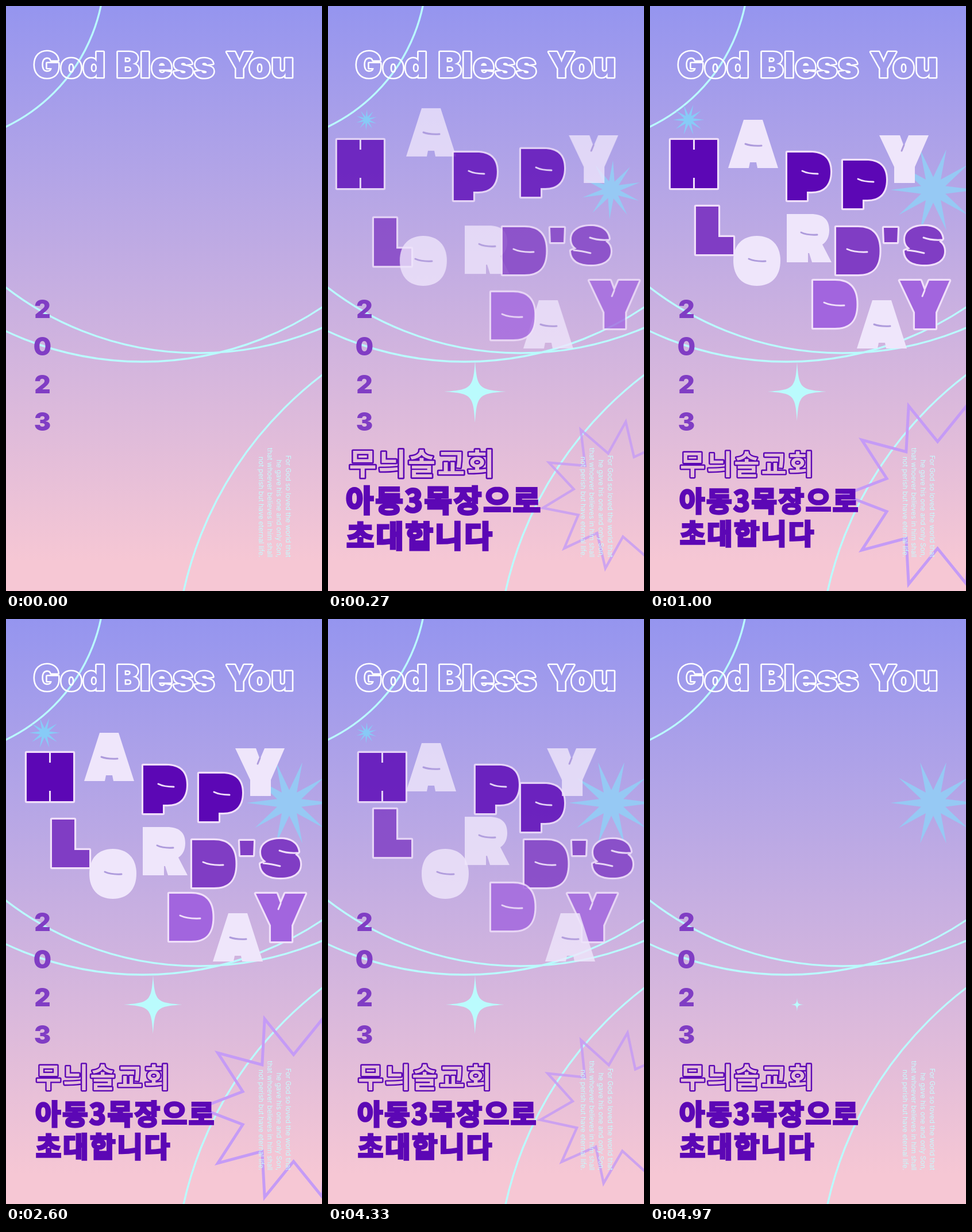
These frames come from a looping animation (550 px wide and 1018 px high, 5010 ms). An HTML page with a canvas:

```html
<!DOCTYPE html>
<html lang="ko">
<head>
<meta charset="utf-8">
<title>Happy Lord's Day</title>
<style>
html, body { margin: 0; width: 100%; height: 100%; overflow: hidden; background: #9595ef; }
canvas { display: block; width: 100vw; height: 100vh; }
</style>
</head>
<body>
<canvas id="stage" width="550" height="1018" role="img" aria-label="Happy Lord's Day"></canvas>
<script>
const W = 550, H = 1018, LOOP = 5010, LEAVE = 4615;
const DARK = '#5c07b5', MID = '#803dc4', LIGHT = '#a265de', PALE = '#efe6fb';
const AQUA = '#bafbfd', EDGE = '#f0dffa';
const LATIN = 'Inter, "Open Sans", sans-serif';
const HANGUL = '"Noto Sans CJK KR", "Noto Sans CJK", sans-serif';

const stage = document.getElementById('stage').getContext('2d');

function layer(w, h) {
  const c = document.createElement('canvas');
  c.width = w;
  c.height = h;
  return c.getContext('2d');
}

const scratch = layer(W, H);
const clamp = v => Math.max(0, Math.min(1, v));

// Progress of an entrance that is mirrored before the time `end`.
const presence = (t, span, end) => clamp(Math.min(t, end - t) / span);

// ---------- text ----------

// Places text so that its ink starts at x.
function inkLeft(g, text, x) {
  return x + g.measureText(text).actualBoundingBoxLeft;
}

// Hollow text: a line around the glyphs with the inside cut away.
function hollowText(g, text, x, y, style, place) {
  scratch.save();
  scratch.clearRect(0, 0, W, H);
  if (place) place(scratch);
  scratch.font = style.font;
  scratch.letterSpacing = style.spacing;
  scratch.lineJoin = 'round';
  scratch.lineWidth = style.line * 2;
  scratch.strokeStyle = style.color;
  const left = inkLeft(scratch, text, x);
  scratch.strokeText(text, left, y);
  scratch.globalCompositeOperation = 'destination-out';
  scratch.fillText(text, left, y);
  scratch.restore();
  g.drawImage(scratch.canvas, 0, 0);
}

function heavyText(g, text, x, y, style) {
  g.font = style.font;
  g.letterSpacing = style.spacing;
  g.fillStyle = g.strokeStyle = style.color;
  g.lineWidth = 3.6;
  g.lineJoin = 'miter';
  g.miterLimit = 3;
  const left = inkLeft(g, text, x);
  g.fillText(text, left, y);
  g.strokeText(text, left, y);
}

const TITLE = { font: `900 60px ${LATIN}`, spacing: '1.5px', line: 2.6, color: '#fff' };
const INVITE = { font: `900 48px ${HANGUL}`, spacing: '3px', line: 2.4, color: DARK };

// ---------- still backdrop ----------

function paintBackdrop() {
  const g = layer(W, H);
  const sky = g.createLinearGradient(0, 0, 0, H);
  sky.addColorStop(0, '#9595ef');
  sky.addColorStop(0.95, '#f6c7d4');
  g.fillStyle = sky;
  g.fillRect(0, 0, W, H);

  g.strokeStyle = AQUA;
  g.lineWidth = 3.3;
  const rings = [[-130, -62, 301.5], [335, 55, 549], [238, 58, 561], [943.6, 1159.7, 650]];
  for (const [x, y, r] of rings) {
    g.beginPath();
    g.arc(x, y, r, 0, Math.PI * 2);
    g.stroke();
  }

  const words = [['God', 50], ['Bless', 194], ['You', 384]];
  for (const [word, x] of words) hollowText(g, word, x, 124, TITLE);

  g.font = `900 44px ${LATIN}`;
  g.fillStyle = MID;
  g.textAlign = 'center';
  [...'2023'].forEach((d, i) => g.fillText(d, 63.5, 542.5 + i * 65.6));
  return g.canvas;
}

// ---------- block letters ----------

const GLYPHS = {
  H: ['M0 0H39V17H42V0H81V84H42V66H39V84H0Z', ''],
  A: ['M27 0H60L87 84H51L49 74H38L36 84H0Z', 'M30 42Q40 46 58 45'],
  P: ['M0 0H40C62 0 75 10 75 33C75 57 63 68 42 68H34V83H0Z', 'M26 32Q36 37 53 37'],
  Y: ['M0 0H36L43 19L51 0H86L62 55V83H26V55Z', 'M43 17L39 27'],
  L: ['M0 0H39V53H65V83H0Z', ''],
  O: ['M41 0C66 0 82 16 82 43C82 71 66 87 41 87C16 87 0 71 0 43C0 16 16 0 41 0Z', 'M27 40Q38 45 56 44'],
  R: ['M0 0H42C63 0 74 9 74 28C74 39 70 48 62 53L78 84H44L39 68H37V84H0Z', 'M25 32Q35 37 53 36'],
  D: ['M0 0H38C63 0 75.5 13 75.5 41C75.5 70 63 82 38 82H0Z', 'M19 38Q32 44 54 43'],
  "'": ['M0 0H24L23 25H1Z', ''],
  S: ['M66 22C64 6 50 0 35 0C15 0 1 8 1 23C1 31 5 36 10 39L0 43C1 60 14 67 35 67' +
      'C56 67 69 59 69 44C69 36 66 31 60 27Z', 'M64 24Q46 25 33 20M5 42Q18 43 34 47']
};

const PAD = 6;

function makeLetter([char, x, y, dx, dy, color]) {
  const g = layer(100, 100);
  const [body, slit] = GLYPHS[char].map(d => new Path2D(d));
  const pale = color === PALE;
  g.translate(PAD, PAD);
  if (!pale) {
    g.strokeStyle = EDGE;
    g.lineWidth = 6.4;
    g.lineJoin = 'round';
    g.stroke(body);
  }
  g.fillStyle = color;
  g.fill(body);
  g.strokeStyle = pale ? '#ae9bdc' : EDGE;
  g.lineWidth = 3;
  g.lineCap = 'round';
  g.stroke(slit);
  return { image: g.canvas, x: x - PAD, y: y - PAD, dx, dy };
}

// char, x, y, travel direction, colour; back to front
const letters = [
  ['H', 36, 233, 1, 0, DARK],
  ['A', 136, 198, 0, 1, PALE],
  ['P', 239, 255, 1, 0, DARK],
  ['P', 336, 269, 0, 1, DARK],
  ['Y', 399, 225, -1, 0, PALE],
  ['L', 80, 349, 0, -1, MID],
  ['O', 145, 400, 1, 0, PALE],
  ['R', 238, 362, 0, -1, PALE],
  ['D', 324, 385, 1, 0, MID],
  ["'", 407, 386, 1, 0, MID],
  ['S', 443, 383, 1, 0, MID],
  ['Y', 435, 478, -1, 0, LIGHT],
  ['A', 360, 512, 1, 0, PALE],
  ['D', 284, 478, 0, -1, LIGHT]
].map(makeLetter);

function drawLetters(t) {
  const rest = 1 - presence(t, 500, LEAVE);
  const shift = 96 * rest * rest * (t < LOOP / 2 ? -1 : 1);
  stage.globalAlpha = presence(t, 345, LEAVE);
  for (const l of letters) {
    stage.drawImage(l.image, l.x + l.dx * shift, l.y + l.dy * shift);
  }
  stage.globalAlpha = 1;
}

// ---------- stars ----------

// Ten-pointed star, starting with the left tip.
function starPath(x, y, outer, inner, turn) {
  stage.beginPath();
  for (let i = 0; i < 20; i++) {
    const a = Math.PI * (1 + i / 10) + turn;
    const r = i % 2 ? inner : outer;
    stage.lineTo(x + r * Math.cos(a), y + r * Math.sin(a));
  }
  stage.closePath();
}

const spin = s => -(1 - s) * 48 * Math.PI / 180;

function drawStar(x, y, r, s, color) {
  if (s <= 0) return;
  starPath(x, y, r * s, r * s * 0.3, spin(s));
  stage.globalAlpha = clamp(0.3 + s);
  stage.fillStyle = color;
  stage.fill();
  stage.globalAlpha = 1;
}

function drawBurst(t) {
  const rest = 1 - presence(t, 500, LEAVE);
  const s = 1 - rest * rest;
  if (s <= 0) return;
  starPath(500.5, 851, 163 * s, 93 * s, spin(s));
  stage.globalAlpha = presence(t, 345, LEAVE);
  stage.strokeStyle = '#c59bf6';
  stage.lineWidth = 5 * (0.4 + 0.6 * s);
  stage.lineJoin = 'miter';
  stage.miterLimit = 10;
  stage.stroke();
  stage.globalAlpha = 1;
}

function drawSparkle(t) {
  const k = presence(t, 350, 4990) - 1;
  const s = 1 + 2.7 * k ** 3 + 1.7 * k ** 2;
  if (s <= 0) return;
  stage.save();
  stage.translate(256, 671);
  stage.scale(s, s);
  stage.beginPath();
  stage.moveTo(0, -51);
  for (let i = 0; i < 4; i++) {
    stage.bezierCurveTo(3, -6, 6, -3, 51, 0);
    stage.rotate(Math.PI / 2);
  }
  stage.fillStyle = AQUA;
  stage.fill();
  stage.restore();
}

// ---------- captions ----------

function zoom(x, y, s) {
  return g => {
    g.translate(x, y);
    g.scale(s, s);
    g.translate(-x, -y);
  };
}

function drawInvite(t) {
  const s = 1 + 0.227 * (1 - clamp(t / 1000)) ** 3;
  stage.save();
  stage.globalAlpha = clamp(t / 130);
  hollowText(stage, '무늬솔교회', 53, 815, INVITE, zoom(229, 803, s));
  zoom(277, 871, s)(stage);
  heavyText(stage, '아동3목장으로', 53, 879, INVITE);
  heavyText(stage, '초대합니다', 53, 936, INVITE);
  stage.restore();
}

const VERSE = [
  'For God so loved the world that',
  'he gave his one and only Son,',
  'that whoever believes in him shall',
  'not perish but have eternal life.'
];

function drawVerse() {
  stage.save();
  stage.translate(486.5, 959.5);
  stage.rotate(Math.PI / 2);
  stage.font = `400 12px ${LATIN}`;
  stage.textAlign = 'right';
  stage.fillStyle = '#c6fafd';
  VERSE.forEach((line, i) => stage.fillText(line, 0, i * 15.6));
  stage.restore();
}

// ---------- loop ----------

const backdrop = paintBackdrop();

function draw(t) {
  stage.drawImage(backdrop, 0, 0);
  if (t >= 30) {
    drawBurst(t);
    drawStar(67, 198, 27, presence(t, 400, 4600), '#87cbf7');
    drawStar(493, 320, 74, clamp(t / 390), '#96c9f4');
    drawSparkle(t);
    drawLetters(t);
    drawInvite(t);
  }
  drawVerse();
}

const start = performance.now();

function tick() {
  draw((performance.now() - start) % LOOP);
  requestAnimationFrame(tick);
}
tick();
</script>
</body>
</html>
```
